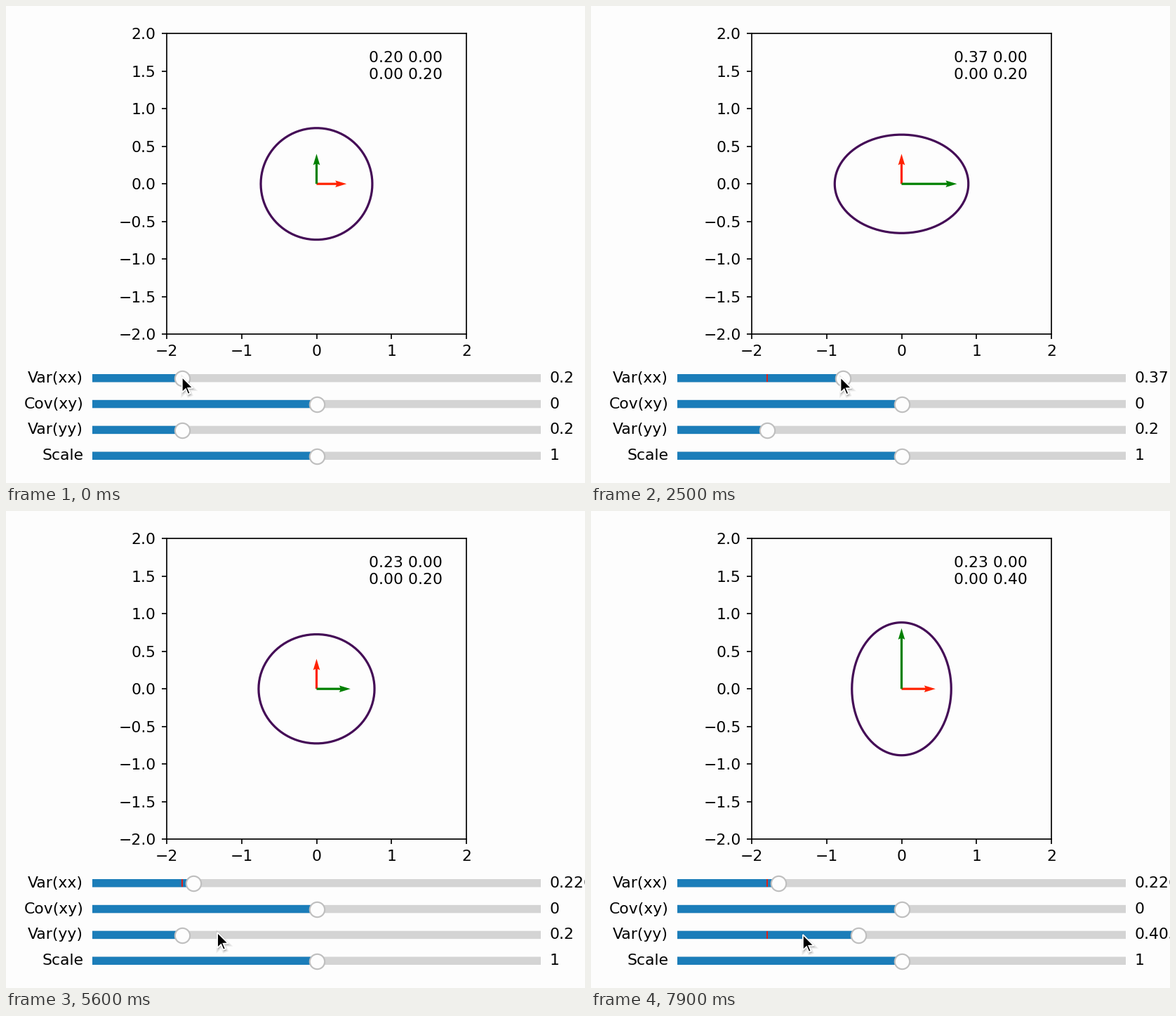
Write a matplotlib script that moves like this. It is 825 by 679 pixels and loops after 8 s.

```python
import numpy as np
import matplotlib.pyplot as plt
from matplotlib.animation import FuncAnimation
from matplotlib.patches import Polygon, Rectangle

W, H, DPI = 825, 679, 128
PX = 72 / DPI               # points per stage pixel
PT = 153.6 / DPI            # scale of the plot's own point sizes
FRAMES, STEP = 80, 100
LAG = 0.45                  # seconds the plot trails the pointer
LEFT, WIDTH = 123, 639      # slider track
ROW, ROW_STEP = 529.7, 36.86
START = 0.2                 # both variances at rest
LEVEL = 0.2                 # density on the contour
PAPER, BLUE, GREY = "#fdfdfd", "#1b7db9", "#d4d4d4"
RED, GREEN, PURPLE = "#ff2200", "#008000", "#440c56"

plt.rcParams.update({"font.family": "DejaVu Sans", "font.size": 10.25 * PT})


def slide(v, lo=0, hi=1):
    return LEFT + WIDTH * (v - lo) / (hi - lo)


def linear(u):
    return u


def ease_out(u):
    return np.sin(u * np.pi / 2)


def ease(u):
    return u * u * (3 - 2 * u)


DROP_XX, GRAB_YY = 3.5, 5.35
HOME = np.array([slide(START), 528])
# pointer legs: begin, end, goal, easing
LEGS = [
    (0.6, 2.4, (slide(0.3776), 528), ease_out),
    (2.4, DROP_XX, (slide(0.226), 532), linear),
    (DROP_XX, 3.7, (257, 645), ease),
    (3.7, 4.6, (255, 615), ease),
    (4.6, 5.1, (slide(START), 602), ease),
    (GRAB_YY, 6.45, (slide(0.4254), 596), ease_out),
    (7.37, 7.9, (slide(0.28), 603), linear),
]


def pointer(t):
    pos = HOME
    for begin, end, goal, curve in LEGS:
        pos = pos + (goal - pos) * curve(np.clip((t - begin) / (end - begin), 0, 1))
    return pos


def dragged(t):
    return (pointer(t)[0] - LEFT) / WIDTH


def short(v):
    """Fewest decimals, up to three, that stay within a thousandth."""
    digits = next((d for d in range(3) if abs(v - round(v, d)) < 1e-3), 3)
    return f"{v:.{digits}f}"


fig = plt.figure(figsize=(W / DPI, H / DPI), dpi=DPI, facecolor=PAPER)

stage = fig.add_axes([0, 0, 1, 1])
stage.set(xlim=(0, W), ylim=(H, 0))
stage.axis("off")

ax = fig.add_axes([228.7 / W, 1 - 467 / H, 427.6 / W, 427.6 / H], facecolor=PAPER)
ax.set(xlim=(-2, 2), ylim=(-2, 2), xticks=range(-2, 3), yticks=np.arange(-2, 2.1, 0.5))
ax.tick_params(length=3.5 * PT, width=0.8 * PT, pad=3.5 * PT)
for spine in ax.spines.values():
    spine.set_linewidth(0.8 * PT)

ring, = ax.plot([], [], color=PURPLE, lw=1.5 * PT, solid_capstyle="butt")
arrows = ax.quiver([0, 0], [0, 0], [1, 0], [0, 1], color=[RED, GREEN], width=0.0075,
                   angles="xy", scale_units="xy", scale=1, zorder=3)
matrix = ax.text(0.7, 1.4, "", linespacing=1.22)


class Track:
    def __init__(self, name, row, value, lo=0, hi=1):
        self.lo, self.hi = lo, hi
        y = ROW + row * ROW_STEP
        x = slide(value, lo, hi)
        box = dict(height=11.4, lw=0, snap=False)
        stage.add_patch(Rectangle((LEFT, y - 5.7), WIDTH, fc=GREY, **box))
        self.bar = stage.add_patch(Rectangle((LEFT, y - 5.7), 0, fc=BLUE, **box))
        stage.plot([x, x], [y - 5.5, y + 5.5], color="#dd2018", lw=2 * PX,
                   solid_capstyle="butt")
        self.knob, = stage.plot([x], [y + 0.3], "o", ms=10 * PT, mfc=PAPER,
                                mec="#bfbfbf", mew=PT, snap=False)
        stage.text(LEFT - 0.02 * WIDTH, y, name, ha="right", va="center")
        self.label = stage.text(LEFT + 1.02 * WIDTH, y, "", va="center")
        self.set(value)

    def set(self, value):
        x = slide(value, self.lo, self.hi)
        self.bar.set_width(x - LEFT)
        self.knob.set_xdata([x])
        self.label.set_text(short(value))


var_x = Track("Var(xx)", 0, START)
Track("Cov(xy)", 1, 0, lo=-1)
var_y = Track("Var(yy)", 2, START)
Track("Scale", 3, 1, hi=2)

ARROW = 1.3 * np.array([(0, 0), (0, 17), (4, 13.2), (6.5, 19), (9, 18), (6.5, 12.2), (12, 12)])
SHADOW_SHIFT = (1, 2)
shadows = [Polygon(ARROW, fc="black", ec="black", lw=w * PX, alpha=0.06, zorder=5)
           for w in (1, 3, 5)]
hand = Polygon(ARROW, fc="black", ec="white", lw=1.8 * PX, zorder=6, joinstyle="miter")
for patch in (*shadows, hand):
    stage.add_patch(patch)

ANGLE = np.linspace(0, 2 * np.pi, 181)


def draw(i):
    t = i * STEP / 1000
    vx = dragged(np.clip(t - LAG, 0, DROP_XX))
    vy = dragged(max(t - LAG, GRAB_YY))
    var_x.set(vx)
    var_y.set(vy)

    r2 = -2 * np.log(2 * np.pi * LEVEL) - np.log(vx * vy)
    ring.set_data(np.sqrt(r2 * vx) * np.cos(ANGLE), np.sqrt(r2 * vy) * np.sin(ANGLE))
    small, large = (2 * vx, 0), (0, 2 * vy)
    if vx > vy + 1e-9:
        small, large = large, small
    arrows.set_UVC(*zip(small, large))
    matrix.set_text(f"{vx:.2f} 0.00\n0.00 {vy:.2f}")

    tip = pointer(t)
    hand.set_xy(ARROW + tip)
    for shadow in shadows:
        shadow.set_xy(ARROW + tip + SHADOW_SHIFT)


anim = FuncAnimation(fig, draw, frames=FRAMES, interval=STEP, repeat=True, repeat_delay=0)
plt.show()
```
